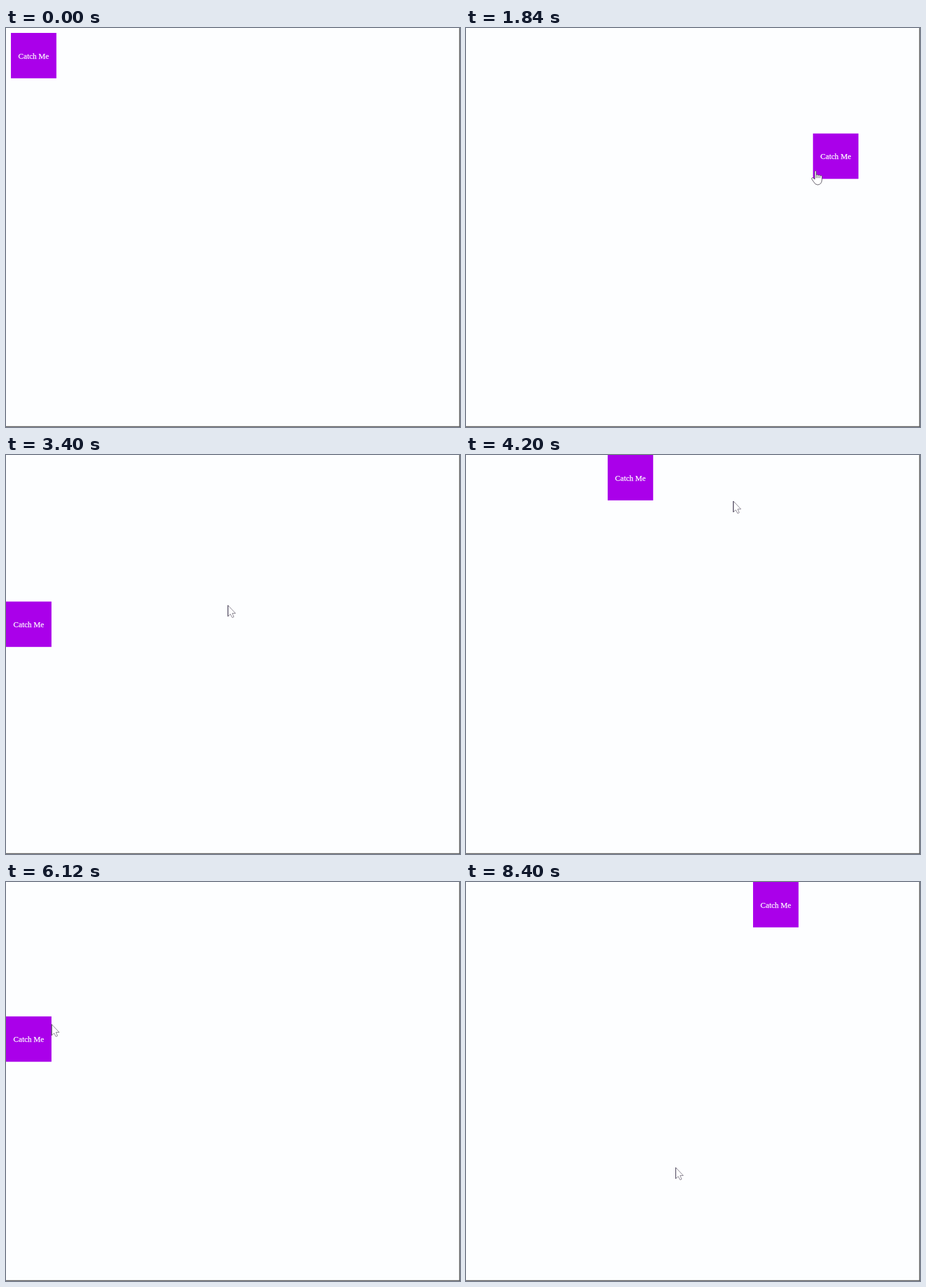
Animation, 737 px wide and 649 px high, one loop 8.64 s. Source, as an HTML page with a canvas:

```html
<!DOCTYPE html>
<html lang="en">
<head>
<meta charset="utf-8">
<title>Catch Me</title>
<style>
html, body { margin: 0; width: 737px; height: 649px; overflow: hidden; }
canvas { display: block; }
</style>
</head>
<body>
<canvas id="stage" width="737" height="649"></canvas>
<script>
const ctx = document.getElementById('stage').getContext('2d');
const LOOP = 8640, STEP = 40, SIZE = 73.8;
const INSET = 4;   // how far the pointer gets into the box
const HOLD = 80;   // how long the box waits before it flees

// The box flees to x, y at the given time; touch is the height in it where it is next caught.
const hops = [
  [0, 8, 8, 52], [1000, 563.3, 171.6, 61.5], [1920, 393, 420, 30],
  [2640, 290.5, 210, 34.5], [3400, 0, 238.4, 30], [3720, 430, 17, 58],
  [4200, 230, 0, 60], [4640, 512.5, 262, 25.5], [5080, 600.4, 265.2, 30],
  [5240, 100, 44, 36], [5840, 0, 218.6, 19.7], [6240, 420, 300, 30],
  [6760, 15, 10.2, 19], [7490, 300, 0, 40], [7800, 89, 380, 30],
  [8080, 336.5, 430, 34.5], [8400, 466, 0, 37]
].map(([time, x, y, touch]) => ({ time, x, y, touch }));

const clamp = (v, low, high) => Math.min(Math.max(v, low), high);
const ease = k => k * k * (3 - 2 * k);

// Each chase runs from the last catch to the nearest side of the box.
let tip = { x: 560, y: 420 };
hops.forEach((hop, i) => {
  hop.from = tip;
  hop.start = Math.max(hop.time, 2 * STEP);
  if (i === hops.length - 1) {
    hop.to = tip;
    hop.end = LOOP;
    return;
  }
  hop.end = hops[i + 1].time - HOLD;
  hop.to = tip = {
    x: clamp(tip.x, hop.x + INSET, hop.x + SIZE - INSET),
    y: hop.y + hop.touch
  };
});

const arrow = new Path2D('M0 0V18L4 14.3L7 20L9.6 18.8L7 13H12.3Z');
const arrowEdge = new Path2D('M0 0V18');
const hand = new Path2D(
  'M-1.2 9V0Q0 -1.8 1.4 0V6Q3 4.6 4.2 6.4Q6 5 7.2 7Q9.6 6 10.6 8.4' +
  'V14Q10 21.5 3.5 22Q-1 21.5 -3 17L-6.4 12Q-5.8 9.5 -3.4 10.8L-1.2 13Z');
const knuckles = new Path2D('M1.4 6V11M4.2 6.4V11M7.2 7V11');

function drawBox({ x, y }) {
  ctx.fillStyle = '#aa00ea';
  ctx.fillRect(x, y, SIZE, SIZE);
  ctx.fillStyle = '#fff';
  ctx.strokeStyle = '#fff';
  ctx.lineWidth = 0.25;
  ctx.font = '12.7px "Liberation Serif", "Times New Roman", serif';
  ctx.textAlign = 'center';
  ctx.fillText('Catch Me', x + SIZE / 2, y + 41.5);
  ctx.strokeText('Catch Me', x + SIZE / 2, y + 41.5);
}

function drawPointer(x, y, over) {
  const shape = over ? hand : arrow;
  ctx.save();
  ctx.translate(x, y);
  ctx.lineWidth = 0.9;
  ctx.fillStyle = '#fff';
  ctx.strokeStyle = over ? '#4a4452' : '#77717f';
  ctx.fill(shape);
  ctx.stroke(shape);
  if (!over) ctx.strokeStyle = '#2c2440';
  ctx.stroke(over ? knuckles : arrowEdge);
  ctx.restore();
}

function draw(now) {
  const t = Math.floor(now % LOOP / STEP) * STEP;
  const hop = hops.findLast(h => h.time <= t);

  ctx.fillStyle = '#fdfeff';
  ctx.fillRect(0, 0, 737, 649);
  drawBox(hop);
  if (t >= hop.start) {
    const k = ease(clamp((t - hop.start) / (hop.end - hop.start), 0, 1));
    const x = hop.from.x + (hop.to.x - hop.from.x) * k;
    const y = hop.from.y + (hop.to.y - hop.from.y) * k;
    const over = x > hop.x && x < hop.x + SIZE && y > hop.y && y < hop.y + SIZE;
    drawPointer(x, y, over);
  }
  ctx.fillStyle = '#5c5c5c';
  ctx.fillRect(735.7, 0, 2, 649);
  ctx.fillRect(0, 647.7, 737, 2);
  requestAnimationFrame(draw);
}
requestAnimationFrame(draw);
</script>
</body>
</html>
```
